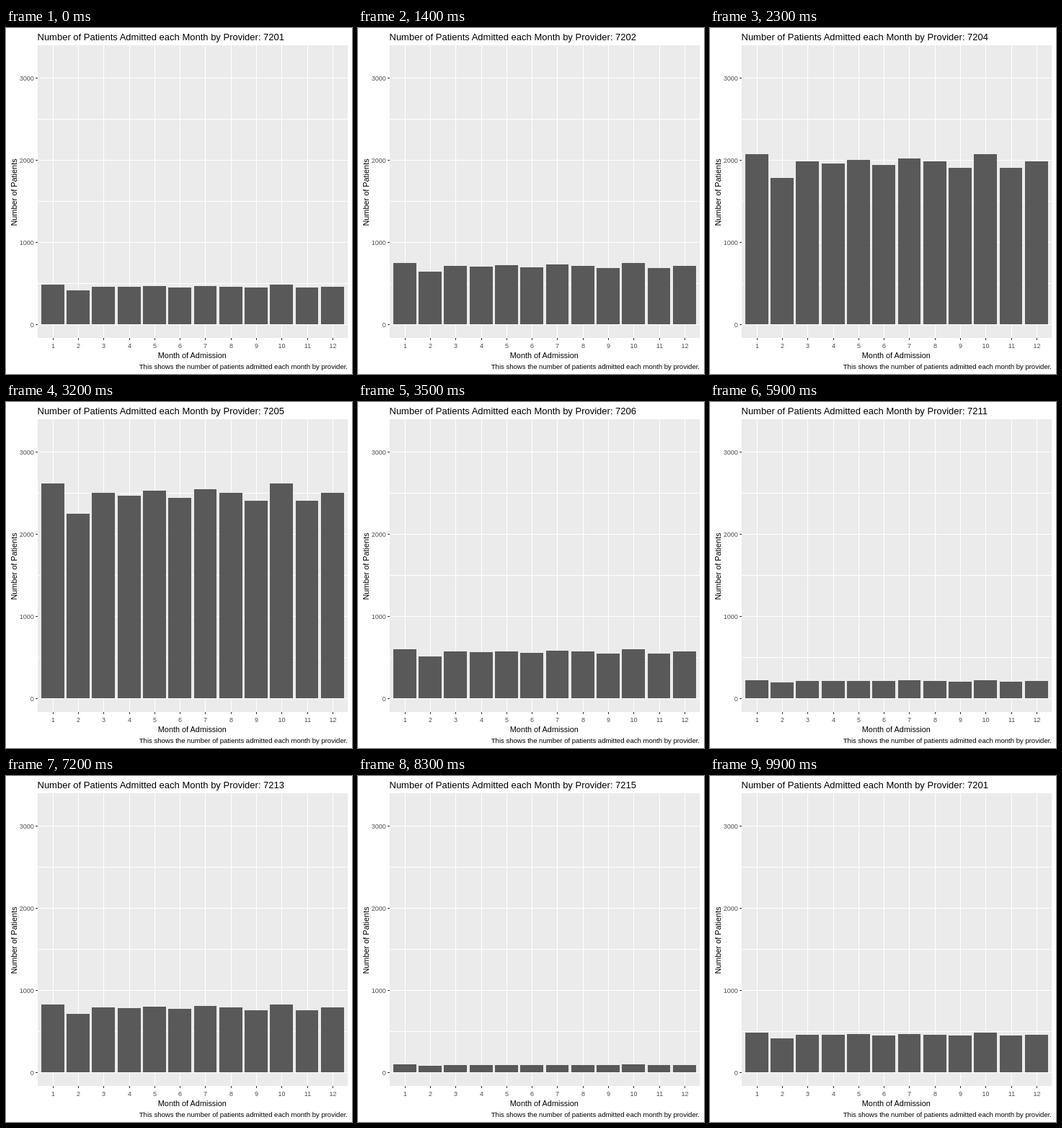
Write an HTML page that moves like this. It is 480x480 px and loops after 10 s.

```html
<!DOCTYPE html>
<html lang="en">
<head>
<meta charset="utf-8">
<title>Patients per month</title>
<style>
  html, body { margin: 0; width: 100%; height: 100%; overflow: hidden; background: #fff; }
  svg { display: block; width: 100vw; height: 100vh; }
  rect { shape-rendering: crispEdges; }
  text { font-family: "Liberation Sans", Arial, sans-serif; font-size: 10.9px; }
  .tick { font-size: 9px; fill: #4d4d4d; }
  #title { font-size: 13px; }
  #caption { font-size: 9.55px; }
</style>
</head>
<body>
<svg viewBox="0 0 480 480">
  <rect x="44" y="24" width="430" height="406" fill="#ebebeb"/>
  <g id="grid" fill="#fff"></g>
  <g id="bars" fill="#595959"></g>
  <g id="axes" fill="#333"></g>
  <text id="title" x="43.5" y="17"></text>
  <text x="258.3" y="458" text-anchor="middle">Month of Admission</text>
  <text transform="translate(15 228) rotate(-90)" text-anchor="middle">Number of Patients</text>
  <text id="caption" x="474" y="473" text-anchor="end">This shows the number of patients admitted each month by provider.</text>
</svg>
<script>
const LOOP = 10000, FRAME = 100, MONTHS = 12;
const BASE = 411, THOUSAND = 114, PITCH = 35.27;
const byId = id => document.getElementById(id);
const column = position => Math.floor(65.325 + PITCH * position);

function add(parent, tag, attrs, text = '') {
  const el = document.createElementNS('http://www.w3.org/2000/svg', tag);
  for (const name in attrs) el.setAttribute(name, attrs[name]);
  el.textContent = text;
  byId(parent).appendChild(el);
  return el;
}
const box = (parent, x, y, width, height) => add(parent, 'rect', { x, y, width, height });
const label = (x, y, anchor, text) =>
  add('axes', 'text', { class: 'tick', x, y, 'text-anchor': anchor }, text);

// Admissions follow the days in the month, plus a quarterly wave that fades mid-year.
function season(month) {
  const days = new Date(2019, month + 1, 0).getDate();
  const fade = 0.5 + 0.5 * Math.cos(2 * Math.PI * month / 9);
  return days / 30.4 + 0.035 * fade * Math.cos(2 * Math.PI * month / 3);
}

// Provider and its mean bar height in pixels.
const providers = [
  [7201, 52], [7202, 47], [7204, 180], [7205, 355], [7206, 64], [7209, 61],
  [7210, 146], [7211, 24], [7213, 103], [7214, 47], [7215, 10], [7216, 84]
];

// Each provider holds, then moves to the next; the early holds are a frame longer.
let arrive = 0;
const stops = providers.map(([id, level], i) => {
  const leave = arrive + (i >= 1 && i <= 4 ? 6 : 5);
  const steps = i === 5 ? 3 : 4;
  arrive = leave + steps - 1;
  return { id, level, leave, steps, arrive };
});

for (let y = BASE; y > 24; y -= THOUSAND / 2) box('grid', 44, y, 430, 1);
for (let k = 0; k <= 3; k++) {
  const y = BASE - THOUSAND * k;
  box('axes', 41, y, 3, 1);
  label(38.7, y + 4, 'end', k * 1000);
}
const bars = Array.from({ length: MONTHS }, (_, month) => {
  const x = column(month), left = column(month - 0.45);
  box('grid', x, 24, 1, 406);
  box('axes', x, 430, 1, 3);
  label(x + 0.5, 444, 'middle', month + 1);
  return box('bars', left, BASE, column(month + 0.45) - left, 0);
});

function draw(time) {
  const frame = Math.floor(time % LOOP / FRAME);
  const index = Math.max(0, stops.findIndex(stop => frame < stop.arrive));
  const from = frame < arrive ? stops[index] : stops[0];
  const to = stops[(stops.indexOf(from) + 1) % stops.length];
  const moving = frame < arrive ? frame - from.leave + 1 : 0;
  const progress = Math.max(0, moving / from.steps);
  const level = from.level + (to.level - from.level) * progress;

  bars.forEach((bar, month) => {
    const height = Math.round(level * season(month));
    bar.setAttribute('y', BASE - height);
    bar.setAttribute('height', height);
  });
  const nearest = progress < 0.5 ? from : to;
  byId('title').textContent = `Number of Patients Admitted each Month by Provider: ${nearest.id}`;
}

const begin = performance.now();
function tick() {
  draw(performance.now() - begin);
  requestAnimationFrame(tick);
}
tick();
</script>
</body>
</html>
```
